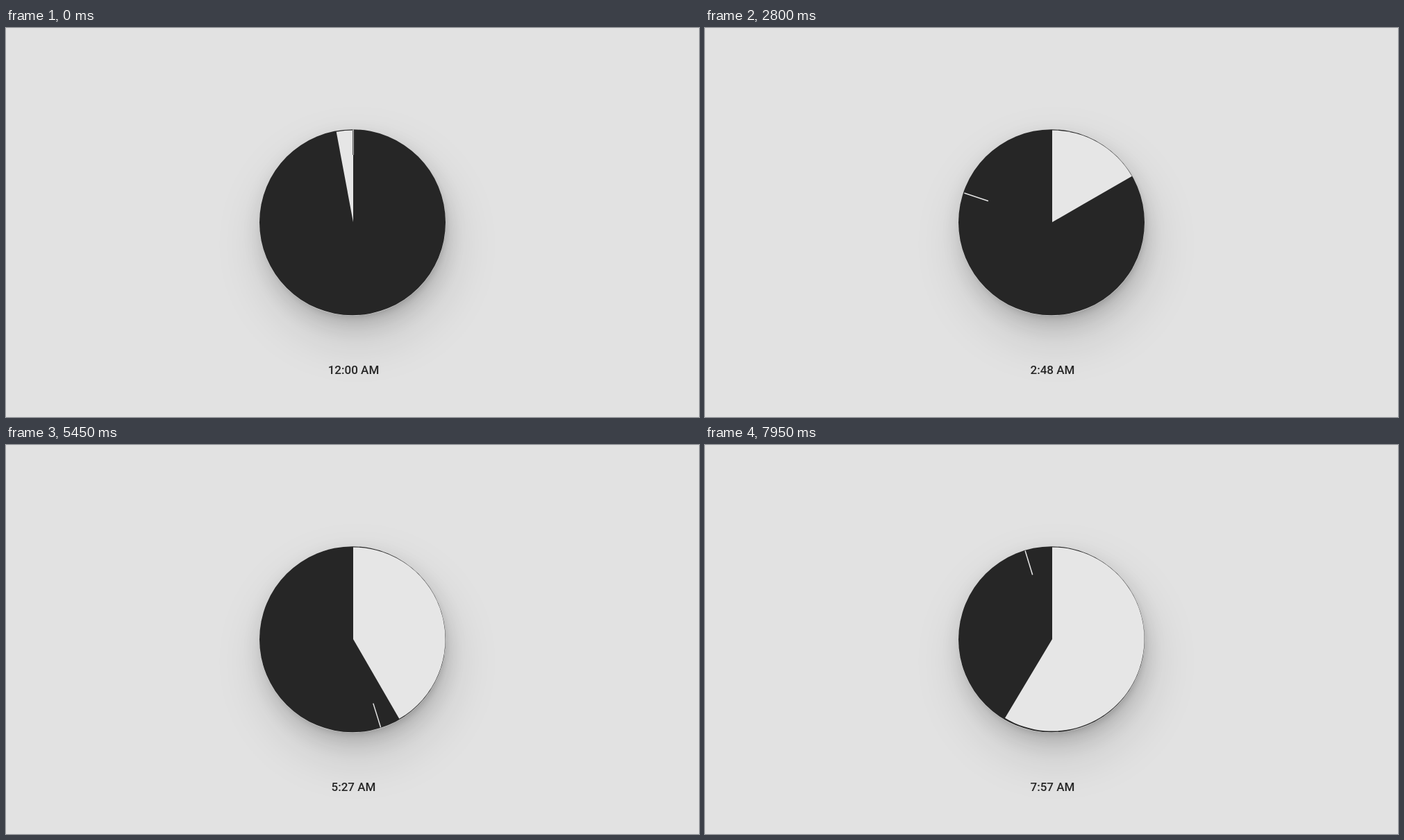
These frames come from a looping animation (998x561 px, 8000 ms). An HTML page:

```html
<!DOCTYPE html>
<html lang="en">
<head>
<meta charset="utf-8">
<title>Clock</title>
<style>
  html, body { margin: 0; width: 100%; height: 100%; overflow: hidden; background: #e2e2e2; }
  svg { display: block; width: 100vw; height: 100vh; }
  text { font: 500 17px Roboto, "Open Sans", sans-serif; fill: #262626; text-anchor: middle; }
</style>
</head>
<body>
<svg viewBox="0 0 998 561">
  <defs>
    <filter id="wide" x="-100%" y="-100%" width="300%" height="300%"><feGaussianBlur stdDeviation="38"/></filter>
    <filter id="mid" x="-50%" y="-50%" width="200%" height="200%"><feGaussianBlur stdDeviation="16"/></filter>
    <filter id="tight" x="-50%" y="-50%" width="200%" height="200%"><feGaussianBlur stdDeviation="5"/></filter>
    <clipPath id="lit"><path class="sector"/></clipPath>
  </defs>
  <rect width="998" height="561" fill="#e2e2e2"/>
  <circle cx="506" cy="312" r="134" opacity=".14" filter="url(#wide)"/>
  <circle cx="502" cy="293" r="131" opacity=".16" filter="url(#mid)"/>
  <circle cx="502" cy="286" r="130" opacity=".14" filter="url(#tight)"/>
  <circle cx="499" cy="280.6" r="134.3" fill="#e6e6e6" opacity=".7"/>
  <circle cx="499" cy="280.3" r="134" fill="#262626"/>
  <path class="sector" fill="#e6e6e6"/>
  <path class="hand" stroke="#e6e6e6" stroke-width="1.5"/>
  <g clip-path="url(#lit)"><path class="hand" stroke="#262626" stroke-width="1.5"/></g>
  <text id="label" x="500.5" y="499"></text>
</svg>
<script>
const LOOP = 8000, STEP = 50;
const CX = 500, CY = 280, R = 132.6;
const LEAD = 0.06, SWEEP = 0.1; // hour sweep: start before the hour, duration
const label = document.getElementById("label");

const setPath = (cls, d) =>
  document.querySelectorAll("." + cls).forEach(el => el.setAttribute("d", d));

// clock angle in degrees, 0 at the top
function point(angle, r) {
  const a = angle * Math.PI / 180;
  return (CX + r * Math.sin(a)).toFixed(2) + " " + (CY - r * Math.cos(a)).toFixed(2);
}

function hourEdge(hours) {
  const n = Math.floor(hours + LEAD);
  const x = Math.min(1, (hours + LEAD - n) / SWEEP);
  return 30 * (n - 1 + x * x * (3 - 2 * x));
}

function draw(ms) {
  const hours = ms / 1000;
  const edge = hourEdge(hours);
  const from = Math.min(0, edge), to = Math.max(0, edge);
  const large = to - from > 180 ? 1 : 0;
  setPath("sector", to - from < 0.01 ? "" :
    `M${CX} ${CY}L${point(from, R)}A${R} ${R} 0 ${large} 1 ${point(to, R)}Z`);

  const hand = hours * 360.13;
  setPath("hand", `M${point(hand, 97)}L${point(hand, 133.4)}`);

  const minutes = Math.floor(hours * 60 + 1e-6);
  const h = Math.floor(minutes / 60) || 12;
  label.textContent = `${h}:${String(minutes % 60).padStart(2, "0")} AM`;
}

const start = performance.now();
function tick() {
  const t = (performance.now() - start + 5) % LOOP;
  draw(Math.floor(t / STEP) * STEP);
  requestAnimationFrame(tick);
}
tick();
</script>
</body>
</html>
```
